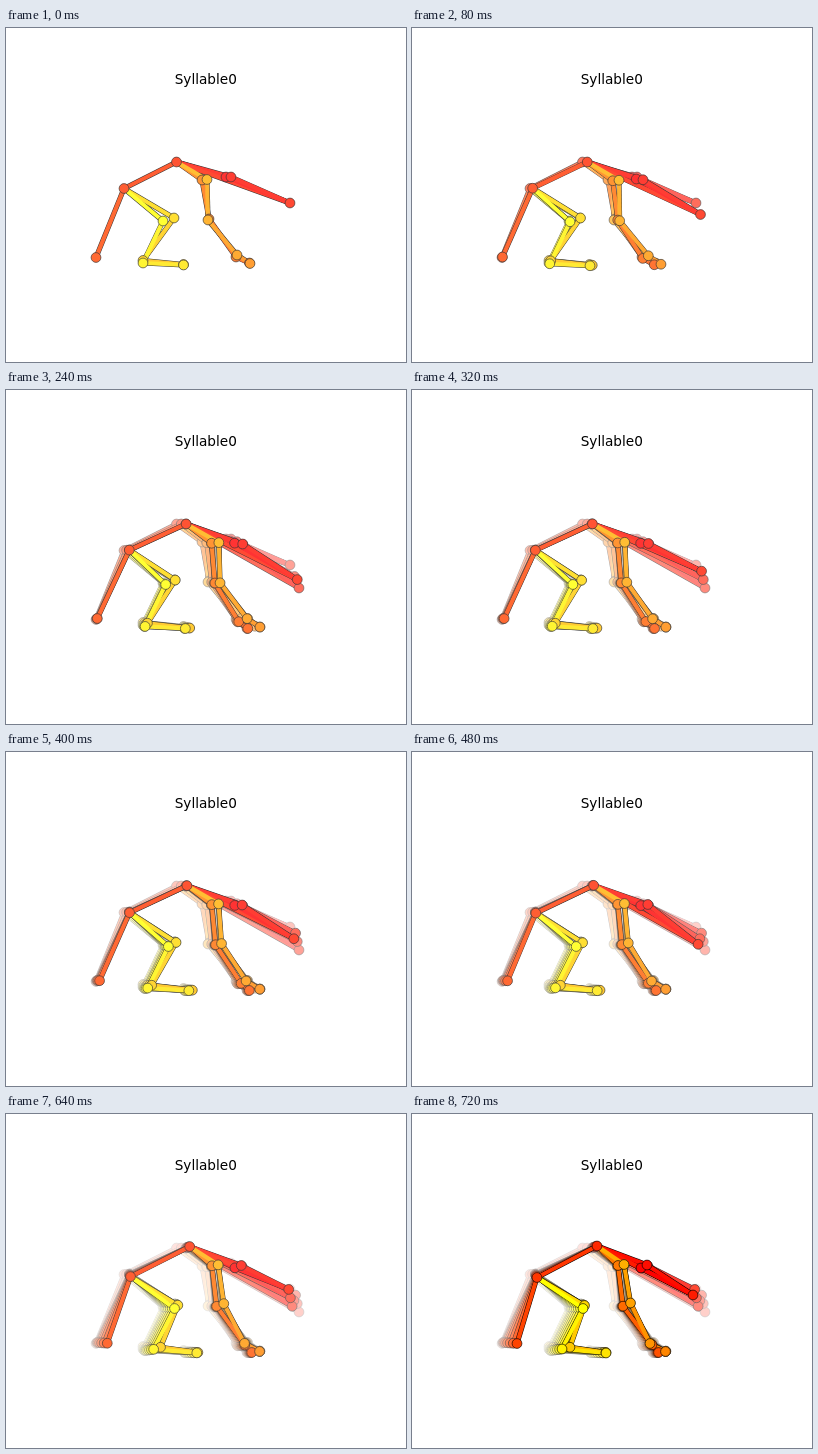
An HTML page with a canvas that plays this animation: 400 px wide and 334 px high, repeating every 800 ms.

```html
<!DOCTYPE html>
<html lang="en">
<head>
<meta charset="utf-8">
<title>Syllable0</title>
<style>
  html, body { margin: 0; width: 100%; height: 100%; overflow: hidden; background: #fff; }
  canvas, svg { position: absolute; left: 0; top: 0; display: block; }
  text { font: 13.65px "DejaVu Sans", sans-serif; text-anchor: middle; }
</style>
</head>
<body>
<canvas id="stage" width="400" height="334"></canvas>
<svg width="400" height="334"><text x="199.8" y="56">Syllable0</text></svg>
<script>
const STEP = 80, STEPS = 10, LUNGE_STEPS = 2, FADE = 0.2;
const NODE_R = 4.9, NODE_RIM = 0.65, LINE = 4.2, LINE_RIM = 0.45;

const lerp = (a, b, t) => a + (b - a) * t;
const joints = [];

// A limb lunges first, by an amount blended along its joints from `first` to `last`.
// Then each joint [x, y, driftX, driftY] drifts on with the given easing power.
function limb(power, first, last, parts, nod = 0) {
  parts.forEach(([x, y, driftX, driftY], i) => {
    const along = i / Math.max(1, parts.length - 1);
    const lungeX = lerp(first[0], last[0], along);
    const lungeY = lerp(first[1], last[1], along);
    joints.push(step => {
      const lunge = Math.min(1, step / LUNGE_STEPS);
      const after = Math.max(0, step - LUNGE_STEPS);
      const drift = (after / (STEPS - 1 - LUNGE_STEPS)) ** power;
      const lift = nod * (1 - Math.cos(after * Math.PI / 2));
      return [x + lungeX * lunge + driftX * drift,
              y + lungeY * lunge + driftY * drift - lift];
    });
  });
}

// Ears, nose, then neck to tail tip
limb(1, [8.5, 4], [12, 5.5], [[220, 149, 0.5, 1], [225, 149, -2, -3.5]]);
limb(1, [9, 23], [9, 23], [[284, 175, -12, -10]], 7);
limb(2, [9.5, 0], [1, -1], [[170.5, 134, 5, -2], [118, 160.5, 1.7, 3.5], [90, 229.5, 14, 1]]);

// Front legs: paw, wrist, elbow, shoulder
limb(1, [-2.5, 3.5], [9.5, 1.5],
  [[243.5, 235, 5.5, 0], [230, 229, 8.5, -1], [203, 191, 2.5, -1], [196, 152, 0.5, -2]]);
limb(1, [10, 1.5], [12, 1.5],
  [[244, 235.5, -0.5, 0.5], [231, 227, -3.7, 1], [202, 192, 5.2, -4.5], [201, 151.5, -1, -2.5]]);

// Hind legs: paw, ankle, knee
limb(1.4, [5.5, 1.5], [1, 0],
  [[177.5, 236.5, 11, 0.5], [137, 232.5, 17.7, 0], [168, 190, 3.5, 1.5]]);
limb(1.5, [1, 1.5], [2, 1.5],
  [[177.5, 237, 15.5, 0.5], [137, 235, 11.5, -1.5], [157, 193, 12, 0]]);

const [earL, earR, nose, neck, tail, tip] = joints.keys();
const leg = (paw, size, root) => [...Array.from({ length: size }, (_, i) => paw + i), root];
const chains = [
  [earL, neck], [earR, neck], [nose, neck], [earL, nose], [earR, nose],
  [tip, tail, neck],
  leg(6, 4, neck), leg(10, 4, neck), leg(14, 3, tail), leg(17, 3, tail),
];
const edges = chains.flatMap(c => c.slice(1).map((to, i) => [c[i], to]));
const colors = joints.map((_, i) => `rgb(255 ${Math.round(255 * i / (joints.length - 1))} 0)`);

const ctx = document.getElementById("stage").getContext("2d");

function drawEdges(pose, width, colorOf) {
  ctx.lineWidth = width;
  for (const [from, to] of edges) {
    ctx.strokeStyle = colorOf(from);
    ctx.beginPath();
    ctx.moveTo(...pose[from]);
    ctx.lineTo(...pose[to]);
    ctx.stroke();
  }
}

function drawPose(step) {
  const pose = joints.map(at => at(step));
  drawEdges(pose, LINE + 2 * LINE_RIM, () => "#000");
  drawEdges(pose, LINE, i => colors[i]);
  ctx.lineWidth = NODE_RIM;
  ctx.strokeStyle = "#000";
  pose.forEach(([x, y], i) => {
    ctx.fillStyle = colors[i];
    ctx.beginPath();
    ctx.arc(x, y, NODE_R, 0, 2 * Math.PI);
    ctx.fill();
    ctx.stroke();
  });
}

function veil(alpha) {
  ctx.fillStyle = `rgb(255 255 255 / ${alpha})`;
  ctx.fillRect(0, 0, 400, 334);
}

// Every pose but the last gets a veil on top, so older poses pale.
function draw(step) {
  veil(1);
  for (let i = 0; i <= step; i++) {
    drawPose(i);
    if (i < STEPS - 1) veil(FADE);
  }
}

let shown = -1;
function tick() {
  const step = Math.floor(performance.now() / STEP) % STEPS;
  if (step !== shown) draw(shown = step);
  requestAnimationFrame(tick);
}
tick();
</script>
</body>
</html>
```
